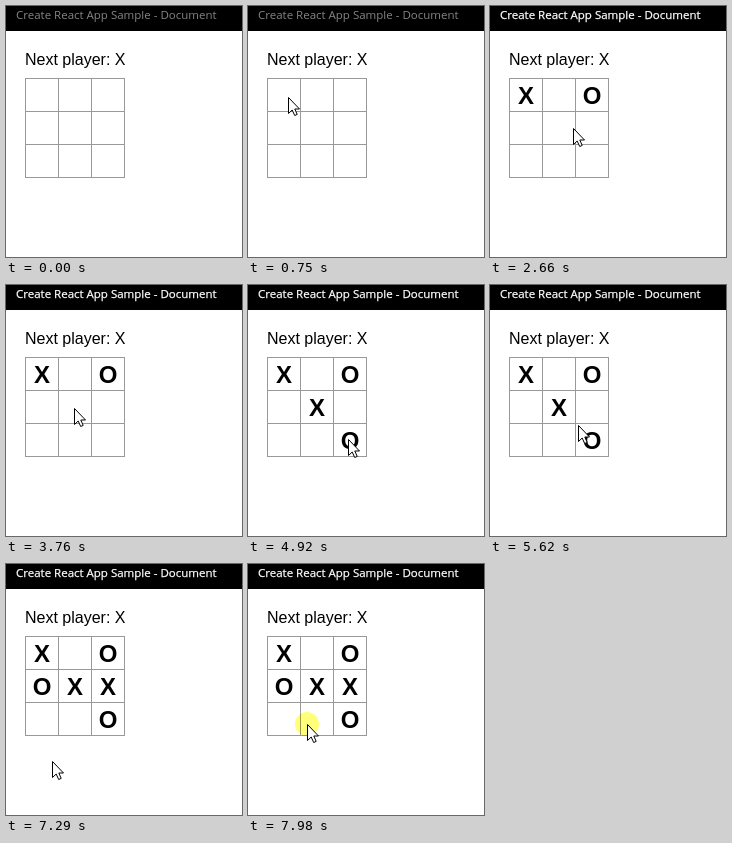
These frames come from a looping animation (236 by 251 pixels, 8 s). An HTML page:

```html
<!DOCTYPE html>
<html lang="en">
<head>
<meta charset="utf-8">
<title>Tic-tac-toe</title>
<style>
html, body { margin: 0; width: 100%; height: 100%; overflow: hidden; background: #fff; }
svg { display: block; }
text { font-family: "Liberation Sans", Arial, sans-serif; }
#title { font: 11.5px "Open Sans", "Noto Sans", sans-serif; fill: #fff; stroke: #fff; stroke-width: .25px; }
#title.idle { fill: #858585; stroke: none; }
#status { font-size: 16px; }
#marks { font-size: 24px; font-weight: bold; text-anchor: middle; }
#halo { fill: #ffff78; mix-blend-mode: multiply; }
</style>
</head>
<body>
<svg width="236" height="251" viewBox="0 0 236 251">
  <rect width="236" height="25"/>
  <text id="title" x="10" y="13">Create React App Sample - Document</text>
  <text id="status" x="19" y="59"></text>
  <path id="grid" stroke="#999"/>
  <g id="marks"></g>
  <circle id="halo" r="12"/>
  <path id="cursor" d="M.5 .5V16.5L4.2 13L6.7 18.5L9.2 17.4L6.8 12H11.5Z" fill="#fff" stroke="#000"/>
</svg>
<script>
const LOOP = 8000, TICK = 68.9, LEAD = 300;
const LEFT = 19, TOP = 72, CELL = 33;
const $ = id => document.getElementById(id);

// Pointer stops, timed in screen ticks. A click marks the cell under the pointer.
const origin = { x: 200, y: 240 };
const stops = [
  [-1, 6, 40, 91, 14],
  [21, 25, 96, 89, 29],
  [30, 37, 76, 141],
  [39, 44, 66, 123],
  [49, 51, 69, 123, 52],
  [53, 63, 100, 154, 64],
  [67, 70, 50, 229],
  [70, 73, 41, 201],
  [73, 79, 101, 124, 80],
  [81, 87, 69, 153],
  [87, 91, 32, 125, 91],
  [92, 97, 34, 152],
  [97, 101, 46, 197],
  [105, 110, 59, 160, 111]
].map(([from, to, x, y, click]) => ({ from, to, x, y, click }));
const clicks = stops.filter(s => s.click);

let lines = "";
for (let i = 0; i < 4; i++) {
  const d = i * CELL + .5;
  lines += `M${LEFT + d} ${TOP}v100M${LEFT} ${TOP + d}h100`;
}
$("grid").setAttribute("d", lines);

const marks = clicks.map(({ x, y }, i) => {
  const col = Math.floor((x - LEFT) / CELL), row = Math.floor((y - TOP) / CELL);
  const el = document.createElementNS("http://www.w3.org/2000/svg", "text");
  el.setAttribute("x", LEFT + 17 + col * CELL);
  el.setAttribute("y", TOP + 26 + row * CELL);
  el.textContent = "XO"[i % 2];
  return $("marks").appendChild(el);
});

const show = (el, on) => el.setAttribute("visibility", on ? "visible" : "hidden");
const ease = k => k * k * k * (10 + k * (6 * k - 15));

function pointerAt(tick) {
  let { x, y } = origin;
  for (const s of stops) {
    if (tick <= s.from) break;
    const k = ease(Math.min(1, (tick - s.from) / (s.to - s.from)));
    x += (s.x - x) * k;
    y += (s.y - y) * k;
  }
  return [Math.round(x), Math.round(y)];
}

function draw(now) {
  const tick = Math.floor((now % LOOP - LEAD) / TICK);
  const place = `translate(${pointerAt(tick)})`;
  const played = clicks.filter(c => c.click < tick).length;

  $("title").classList.toggle("idle", tick < clicks[0].click);
  $("status").textContent = "Next player: " + "XO"[played % 2];
  marks.forEach((el, i) => show(el, i < played));
  $("cursor").setAttribute("transform", place);
  $("halo").setAttribute("transform", place);
  show($("cursor"), tick >= 0);
  show($("halo"), clicks.some(c => c.click === tick));
}

function run() {
  draw(performance.now());
  requestAnimationFrame(run);
}
run();
</script>
</body>
</html>
```
